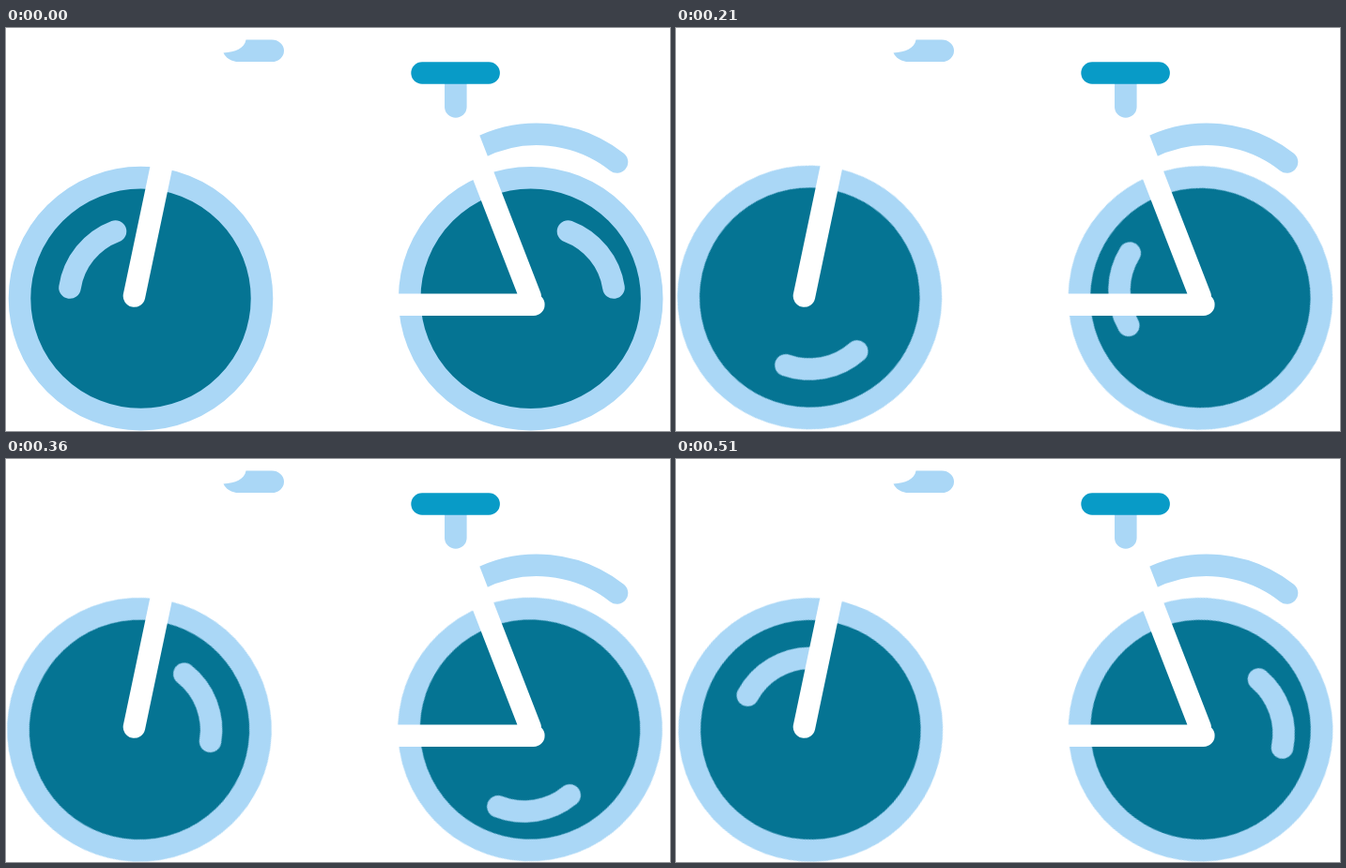
Animation of 707 by 430 pixels, one loop 540 ms. Source, as an HTML page:

```html
<!DOCTYPE html>
<html lang="en">
<head>
<meta charset="utf-8">
<title>Bicycle</title>
<style>
  html, body { margin: 0; width: 100%; height: 100%; overflow: hidden; background: #fff; }
  svg { display: block; width: 707px; height: 430px; }
  .light { fill: #aad7f6; }
  .line { fill: none; stroke: #aad7f6; stroke-width: 23.6; stroke-linecap: round; }
  .tyre { fill: #057493; stroke: #aad7f6; stroke-width: 23.6; }
  .frame { stroke: #fff; }
  .wheel { animation: spin 540ms steps(18) infinite; }
  .front { transform-origin: 142.7px 288.3px; }
  .rear { transform-origin: 558.4px 288.4px; }
  @keyframes spin { to { transform: rotate(-360deg); } }
</style>
</head>
<body>
<svg viewBox="0 0 707 430">
  <g class="wheel front">
    <circle class="tyre" cx="143.5" cy="288.6" r="129"/>
    <path class="line" d="M68 277A76.4 76.4 0 0 1 116.5 217"/>
  </g>
  <g class="wheel rear">
    <circle class="tyre" cx="558.7" cy="288.7" r="129"/>
    <path class="line" d="M647 277A76.4 76.4 0 0 0 598.5 217"/>
  </g>

  <!-- mudguard -->
  <path class="line" stroke-linecap="butt" d="M503 128.3A137 137 0 0 1 650.5 143"/>

  <!-- fork and frame -->
  <path class="line frame" d="M136.5 286L168.6 133"/>
  <path class="line frame" d="M400 295.2H561.8M558.2 286.5L486 100"/>

  <!-- handlebar -->
  <path class="light" d="M255.5 12.5H283a13 11.8 0 0 1 0 23.6H248C240 36 234 32 231.5 26.5C244 25.5 254 22 255.5 12.5Z"/>

  <!-- saddle -->
  <path class="line" d="M478.8 50V84"/>
  <rect x="431.3" y="36.2" width="94.6" height="23.6" rx="11.8" fill="#089bc7"/>
</svg>
</body>
</html>
```
